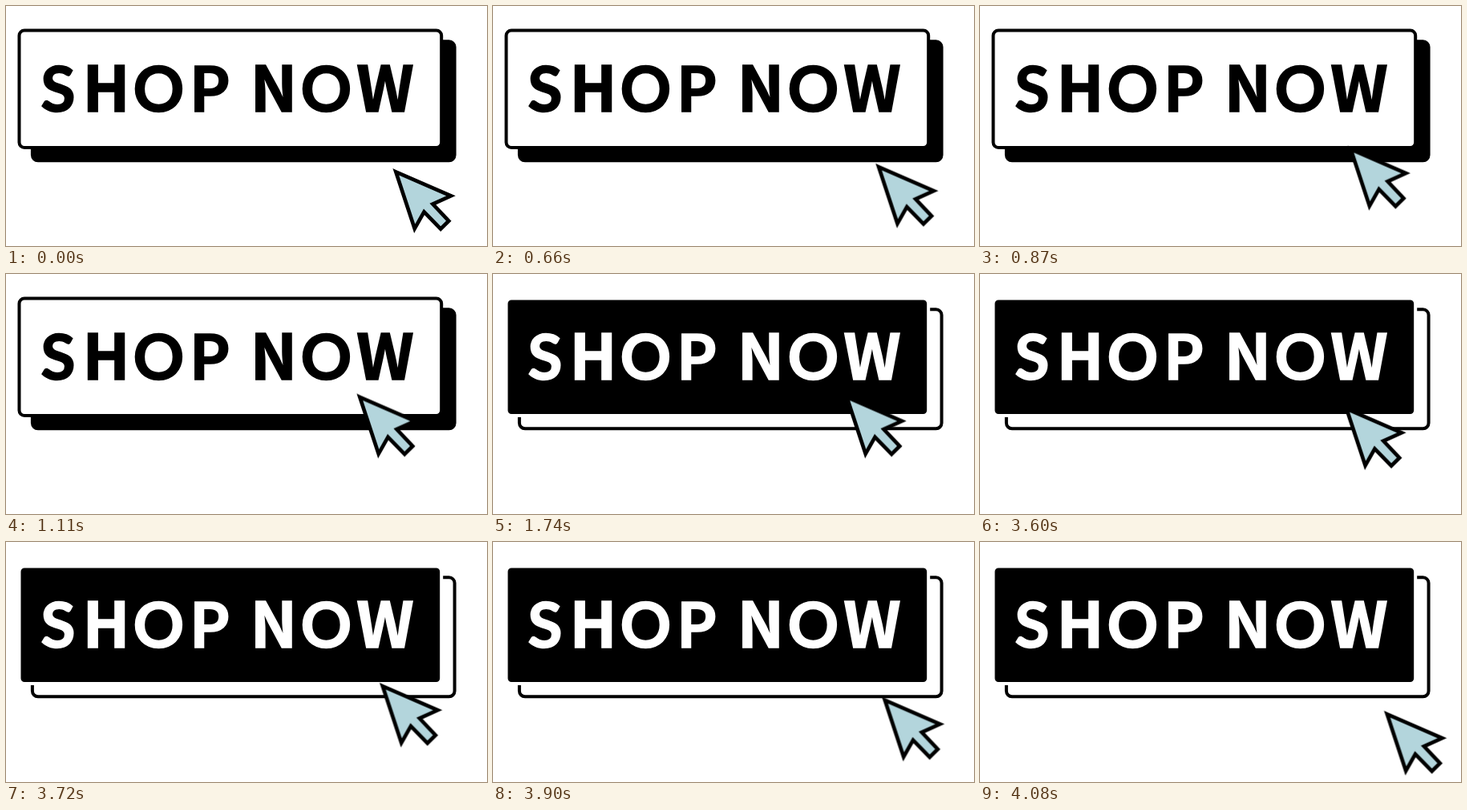
Write an HTML page that moves like this. It is 600x300 px and loops after 5100 ms.

```html
<!DOCTYPE html>
<html lang="en">
<head>
<meta charset="utf-8">
<title>Shop now button</title>
<style>
  html, body { margin: 0; width: 100%; height: 100%; overflow: hidden; background: #fff; }
  svg { display: block; width: 100%; height: 100%; }

  .button { fill: #fff; color: #000; animation: press 5.1s step-end infinite; }
  .shadow { fill: currentColor; stroke: #000; stroke-width: 4; }
  .face { stroke: currentColor; stroke-width: 4; }
  .label {
    font: 700 79px Lato, sans-serif;
    text-anchor: middle;
    fill: currentColor;
    stroke: currentColor;
    stroke-width: 1.6;
  }
  /* Narrower H, N and W */
  .narrow { font: 700 78px "Noto Sans CJK JP", "Noto Sans CJK SC", "Noto Sans CJK", sans-serif; }
  .cursor {
    fill: #b3d5dc;
    stroke: #000;
    stroke-width: 4.7;
    stroke-miterlimit: 6;
    animation: travel 5.1s infinite;
  }

  @keyframes press {
    0% { fill: #fff; color: #000; }
    34.1%, 100% { fill: #000; color: #fff; }
  }
  /* The pointer moves in 30 ms ticks. */
  @keyframes travel {
    0% { transform: none; }
    12.34% { transform: none; animation-timing-function: steps(17, start); }
    22.34% { transform: translate(-45px, -53.5px); }
    68.22% { transform: translate(-45px, -53.5px); animation-timing-function: steps(21, start); }
    80.575%, 100% { transform: translate(21.5px, 7.8px); }
  }
</style>
</head>
<body>
<svg viewBox="0 0 600 300">
  <g class="button">
    <rect class="shadow" x="32.9" y="44.3" width="526.7" height="149" rx="7"/>
    <rect class="face" x="16.5" y="30.5" width="526.7" height="146.6" rx="6.5"/>
    <text class="label" y="131.5" x="65 125 190.5 254 295 334 399.5 473">S<tspan class="narrow">H</tspan>OP <tspan class="narrow">N</tspan>O<tspan class="narrow">W</tspan></text>
  </g>
  <path class="cursor" d="M486.3 207.3 L555 237.3 L532.4 247.5 L552.3 268.6 L542.2 278.6 L521.5 257.3 L509.7 278.3 Z"/>
</svg>
</body>
</html>
```
